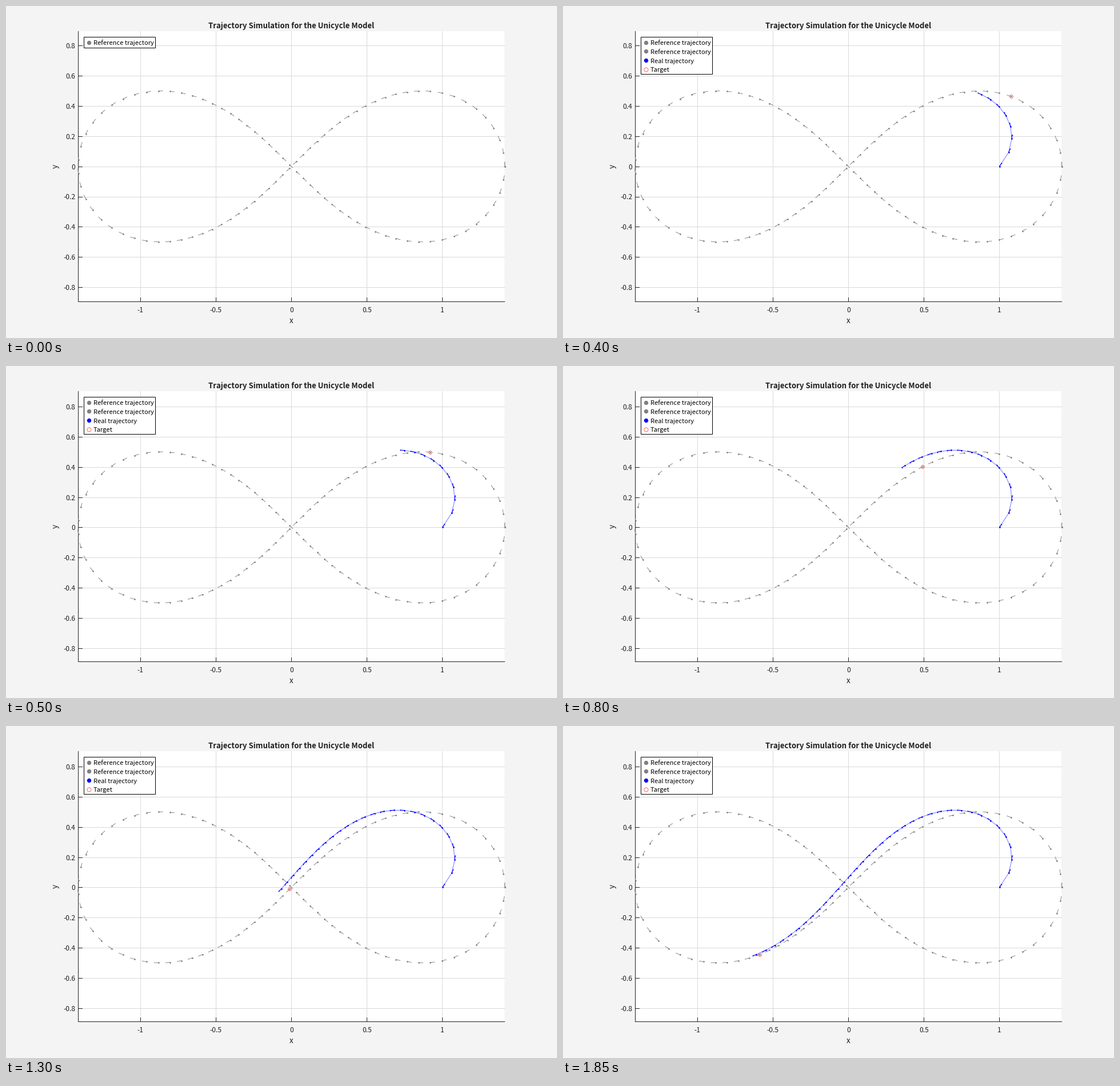
These frames come from a looping animation (964 by 581 pixels, 1900 ms). A matplotlib script:

```python
import numpy as np
import matplotlib.pyplot as plt
from matplotlib.animation import FuncAnimation
from matplotlib.patches import Rectangle

W, H, DPI = 964, 581, 100
PX = 72 / DPI                        # points per pixel
LEFT, RIGHT, TOP, BOTTOM = 126, 872, 44, 517
X0, Y_MID, UNIT = 499.3, 280.7, 264  # origin and pixels per data unit
STEPS = 38
INK, GRAY, BLUE, RED = "#212121", "#7f7f7f", "#0000ff", "#ff3030"

plt.rcParams["font.family"] = ["Noto Sans CJK JP", "DejaVu Sans"]


def lemniscate(t):
    """Points in pixels from the origin, y pointing up."""
    r = np.sqrt(2) * UNIT * np.cos(t) / (1 + np.sin(t) ** 2)
    return np.column_stack([r, r * np.sin(t)])


def tracking_error(i):
    """Robot minus target: a quick first correction, then a slow decay."""
    dx = -36 * np.exp(-0.54 * i) - 73 * np.exp(-0.046 * i - 0.00074 * i**2)
    dy = 1.6 * i * np.exp(-i / 6)
    return np.column_stack([dx, dy])


def tips(points, tangent, length):
    return points + length * tangent / np.hypot(*tangent.T)[:, None]


def strokes(a, b):
    """Join a[i] to b[i], with breaks between the strokes."""
    return np.stack([a, b, np.full_like(a, np.nan)], 1).reshape(-1, 2)


T = np.linspace(0, 2 * np.pi, 100)
REF = lemniscate(T)
REF_DASH = strokes(REF, tips(REF, lemniscate(T + 1e-4) - REF, 7.5))
POSES = REF[:STEPS] + tracking_error(np.arange(STEPS))
POSE_TIPS = tips(POSES, np.gradient(POSES, axis=0), 6.5)
POSE_DASH = strokes(POSES, POSE_TIPS)

fig = plt.figure(figsize=(W / DPI, H / DPI), dpi=DPI, facecolor="#f4f4f4")
ax = fig.add_axes([0, 0, 1, 1])
ax.set_xlim(0, W)
ax.set_ylim(H, 0)
ax.axis("off")


def line(x, y, color, width=1, z=2):
    return ax.plot(x, y, color=color, lw=width * PX, zorder=z)[0]


def dots(color, size, z, x=(), y=(), **kw):
    style = dict(mew=0) | kw
    return ax.plot(x, y, "o", color=color, ms=size * PX, zorder=z, **style)[0]


def ring(size, z, x=(), y=()):
    return dots(RED, size, z, x, y, mfc="none", mew=0.75 * PX)


def text(x, y, s, size, color=INK, **kw):
    style = dict(ha="center", va="baseline") | kw
    return ax.text(x, y, s, fontsize=size * PX, color=color, zorder=9, **style)


def box(x, y, w, h, z, **kw):
    return ax.add_patch(Rectangle((x, y), w, h, zorder=z, **kw))


# Plot area, fixed axes and labels
box(LEFT, TOP, RIGHT - LEFT, BOTTOM - TOP, 0, fc="#ffffff", ec="none")
for v in np.arange(-2, 3) / 2:
    x = X0 + v * UNIT
    line([x, x], [TOP, BOTTOM], "#d9d9d9", z=1)
    line([x, x], [BOTTOM - 7, BOTTOM], INK, z=3)
    text(x, 535.5, f"{v:g}", 12.1)
line([LEFT, LEFT], [TOP, BOTTOM], INK, z=3)
line([LEFT, RIGHT], [BOTTOM, BOTTOM], INK, z=3)
text(X0, 38.5, "Trajectory Simulation for the Unicycle Model", 13.2,
     weight="bold")
text(X0, 554.7, "x", 13.4)
text(94, 280.5, "y", 13.4, rotation=90, ha="right", va="center")

# Horizontal grid, shifted when the view follows the data
rows = []
for v in np.arange(-4, 5) / 5:
    rows.append((v * UNIT,
                 line([LEFT, RIGHT], [0, 0], "#d9d9d9", z=1),
                 line([LEFT, LEFT + 7], [0, 0], INK, z=3),
                 text(121.5, 0, f"{v:g}", 12.1, ha="right")))

# Curves
ref_dash = line([], [], GRAY, 0.9, 4)
ref_dots = dots(GRAY, 2.7, 4)
path = line([], [], "#8080ff", 1.1, 5)
pose_dash = line([], [], BLUE, 1.1, 6)
pose_dots = dots(BLUE, 2.7, 6)
tip_dots = dots(BLUE, 1.8, 6)
target = ring(5.6, 7)

# Legend
frame = box(136, 54, 125, 19, 7, fc="white", ec="black", lw=PX)
extra = []
for i, (name, color) in enumerate([("Reference trajectory", GRAY),
                                   ("Reference trajectory", GRAY),
                                   ("Real trajectory", BLUE),
                                   ("Target", None)]):
    y = 63.5 + 15.7 * i
    mark = dots(color, 7.4, 8, [145], [y]) if color else ring(7, 8, [145], [y])
    label = text(153, y + 4.6, name, 11.1, "black", ha="left")
    if i:
        extra += [mark, label]


def update(k):
    # The view stays centred on the full height of the data
    top = max(UNIT / 2, POSE_TIPS[:k, 1].max(initial=0))
    y0 = Y_MID + (top - UNIT / 2) / 2

    def place(artist, pts):
        artist.set_data(X0 + pts[:, 0], y0 - pts[:, 1])

    for dy, grid, tick, label in rows:
        y = y0 - dy
        grid.set_ydata([y, y])
        tick.set_ydata([y, y])
        label.set_y(y + 5)
    place(ref_dash, REF_DASH)
    place(ref_dots, REF)
    place(path, POSES[:k])
    place(pose_dash, POSE_DASH[:3 * k])
    place(pose_dots, POSES[:k])
    place(tip_dots, POSE_TIPS[:k])
    place(target, REF[max(k - 1, 0):k])
    frame.set_height(65 if k else 19)
    for artist in extra:
        artist.set_visible(k > 0)


anim = FuncAnimation(fig, update, frames=STEPS, interval=50, repeat=True,
                     repeat_delay=0, blit=False)
plt.show()
```
